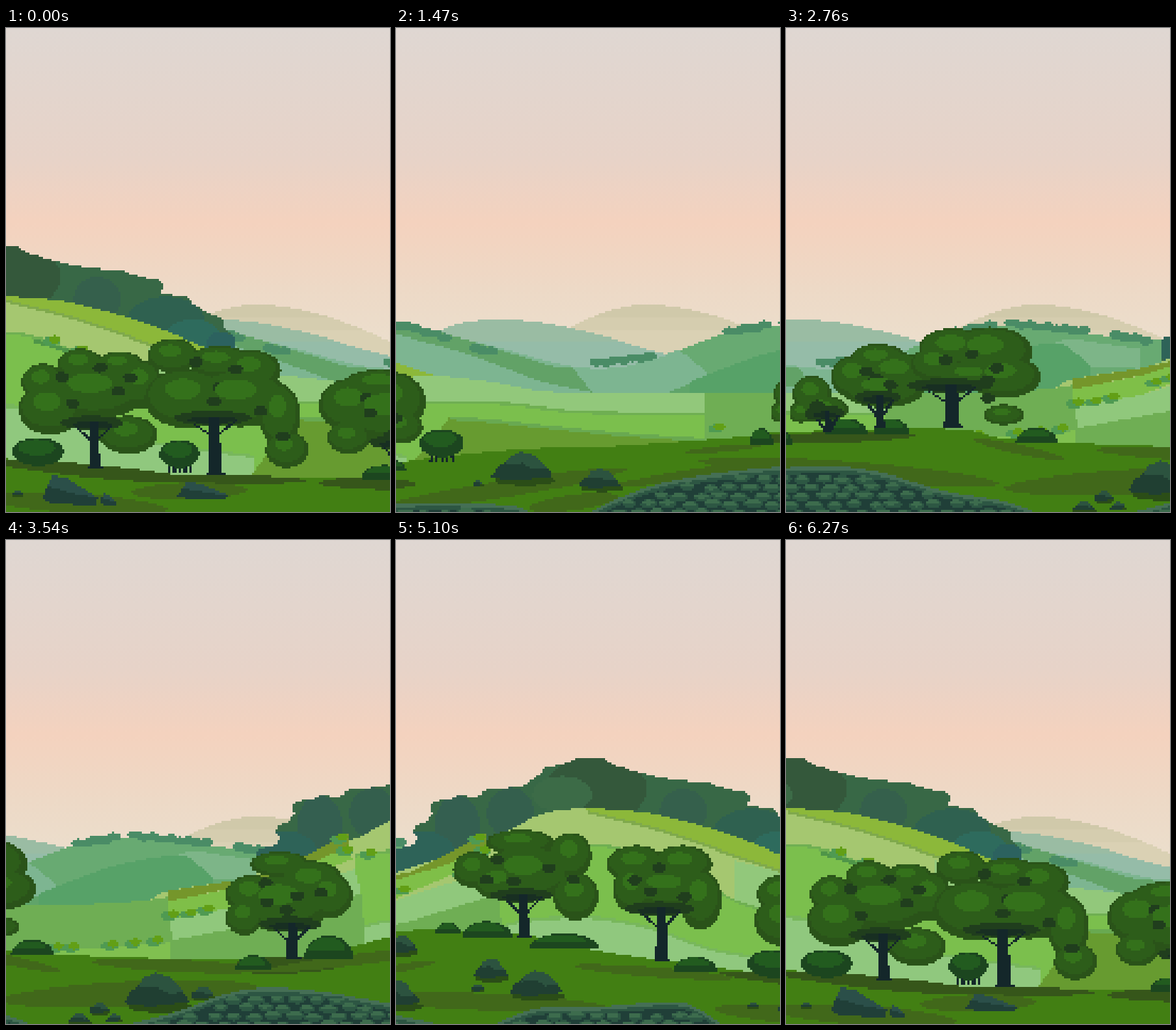
Animation, 540 px wide and 679 px high, one loop 6300 ms. Source, as an HTML page with a canvas:

```html
<!DOCTYPE html>
<html lang="en">
<head>
<meta charset="utf-8">
<title>Rolling hills</title>
<style>
html, body { margin: 0; width: 100%; height: 100%; overflow: hidden; }
canvas { display: block; width: 100vw; height: 100vh; image-rendering: pixelated; }
</style>
</head>
<body>
<canvas id="stage" width="178" height="224"></canvas>
<script>
const COLS = 178, ROWS = 224, CELL = 540 / COLS, STEP = 30, STEPS = 210;
const stage = document.getElementById('stage').getContext('2d');
let pen, span, seed = 7;
const random = () => (seed = seed * 16807 % 2147483647) / 2147483647;

// Crisp scanline fill; anything crossing a layer's end wraps to its start.
function poly(color, pts) {
  pen.fillStyle = color;
  const n = pts.length;
  for (let row = 0; row < ROWS; row++) {
    const y = (row + 0.5) * CELL, hits = [];
    for (let i = 0; i < n; i += 2) {
      const x1 = pts[i], y1 = pts[i + 1], x2 = pts[(i + 2) % n], y2 = pts[(i + 3) % n];
      if ((y1 <= y) !== (y2 <= y)) hits.push(x1 + (y - y1) * (x2 - x1) / (y2 - y1));
    }
    hits.sort((a, b) => a - b);
    for (let i = 0; i + 1 < hits.length; i += 2) {
      const a = Math.round(hits[i] / CELL), w = Math.round(hits[i + 1] / CELL) - a;
      for (const shift of [-span, 0, span]) pen.fillRect(a + shift, row, w, 1);
    }
  }
}

function arc(color, x, y, rx, ry, from, to) {
  const pts = [];
  for (let i = 0; i <= 28; i++) {
    const a = from + (to - from) * i / 28;
    pts.push(x + rx * Math.cos(a), y + ry * Math.sin(a));
  }
  poly(color, pts);
}
const oval = (color, x, y, rx, ry) => arc(color, x, y, rx, ry, 0, 2 * Math.PI);
const dome = (color, x, y, r, h) => arc(color, x, y, r, h, Math.PI, 2 * Math.PI);

// Smooth line through a few points.
function curve(...pts) {
  const out = [], last = pts.length / 2 - 1;
  const at = (i, k) => pts[2 * Math.max(0, Math.min(last, i)) + k];
  for (let i = 0; i < last; i++) {
    for (let s = 0; s < 8; s++) {
      const t = s / 8;
      for (let k = 0; k < 2; k++) {
        const a = at(i - 1, k), b = at(i, k), c = at(i + 1, k), d = at(i + 2, k);
        out.push(b + t / 2 * (c - a + t * (2 * a - 5 * b + 4 * c - d + t * (3 * (b - c) + d - a))));
      }
    }
  }
  return [...out, at(last, 0), at(last, 1)];
}

const lower = (pts, dy) => pts.map((v, i) => i % 2 ? v + dy : v);
const cap = (pts, top) => pts.map((v, i) => i % 2 ? Math.max(v, top) : v);
const ground = (color, pts, floor = 700) => poly(color, [...pts, pts[pts.length - 2], floor, pts[0], floor]);

function between(color, top, bottom) {
  const back = [];
  for (let i = bottom.length - 2; i >= 0; i -= 2) back.push(bottom[i], bottom[i + 1]);
  poly(color, [...top, ...back]);
}
const band = (color, pts, thick) => between(color, pts, lower(pts, thick));

function layer(width, speed, paint) {
  const canvas = document.createElement('canvas');
  canvas.width = span = width;
  canvas.height = ROWS;
  pen = canvas.getContext('2d');
  paint();
  return { canvas, width, speed };
}

function paintSky() {
  const sky = pen.createLinearGradient(0, 0, 0, 150);
  ['#dfd7d2', '#e3d5cd', '#e7d3c8', '#f4d2be', '#edd9c6', '#ebdfcd']
    .forEach((color, i) => sky.addColorStop(i / 5, color));
  pen.fillStyle = sky;
  pen.fillRect(0, 0, COLS, ROWS);
  const far = curve(200, 445, 262, 412, 310, 394, 360, 388, 425, 398, 480, 415, 540, 440);
  ground('#d0c9aa', far);
  ground('#d5cdaf', cap(far, 406));
  ground('#dad1b4', cap(far, 424));
}

function paintTeal() {
  const top = curve(0, 480, 120, 455, 200, 428, 255, 412, 338, 412, 431, 430, 521, 456, 637, 480);
  ground('#9abca3', top);
  ground('#95bca8', cap(top, 440));
}

function hedge(x1, y1, x2, y2) {
  const count = Math.max(1, Math.round((x2 - x1) / 13));
  for (let i = 0; i <= count; i++) {
    const k = i / count;
    oval('#4a8c66', x1 + (x2 - x1) * k, y1 + (y2 - y1) * k + i % 2 * 2, 10, 6);
  }
}

function paintMiddle() {
  const left = curve(200, 400, 280, 419, 400, 448, 505, 475, 580, 475, 660, 452);
  const right = curve(656, 452, 720, 429, 790, 418, 870, 419, 940, 433, 1115, 440);
  ground('#7db591', left);
  ground('#68aa72', right);
  poly('#7db591', [640, 456, 657, 452, 703, 490, 725, 520, 640, 520]);
  poly('#60a46a', [641, 512, 700, 487, 740, 520]);
  between('#62a267', curve(239, 411, 359, 438, 479, 475, 504, 475), curve(239, 425, 359, 458, 459, 495, 534, 512));
  poly('#7db588', [866, 440, 890, 436, 985, 450, 985, 478, 916, 475]);
  ground('#57a268', curve(671, 497, 726, 475, 786, 455, 866, 442, 890, 452, 916, 475), 514);
  hedge(250, 414, 272, 418);
  hedge(286, 422, 326, 433);
  hedge(370, 449, 392, 453);
  hedge(540, 469, 615, 460);
  hedge(727, 426, 776, 417);
  hedge(806, 414, 907, 425);
  hedge(954, 431, 994, 437);
}

function paintWood() {
  const top = [-280, 436, -250, 428, -235, 398, -212, 366, -185, 359, -168, 363, -140, 349, -100, 346, -55, 318, -15, 307, 8, 306,
    40, 320, 100, 335, 160, 341, 205, 352, 215, 372, 245, 376, 290, 404, 321, 434];
  ground('#386846', top, 472);
  for (let i = 4; i < top.length - 2; i += 2) oval('#386846', top[i], top[i + 1] + 11, 16, 12);
  // Crowns stay inside the silhouette.
  pen.globalCompositeOperation = 'source-atop';
  oval('#34583b', 5, 350, 72, 46);
  oval('#3c6b47', -42, 357, 42, 25);
  oval('#345f4d', -115, 383, 33, 36);
  oval('#345f50', -190, 400, 32, 42);
  oval('#2e6358', -245, 440, 52, 32);
  oval('#35604c', 128, 381, 33, 32);
  oval('#2f6150', 225, 412, 55, 35);
  oval('#2e6b5d', 263, 433, 38, 24);
  oval('#2c625f', 303, 444, 22, 17);
  pen.globalCompositeOperation = 'source-over';
}

function shrub(x, y) {
  oval('#4f9a52', x - 3, y + 2, 12, 6);
  oval('#629f16', x + 2, y - 1, 8, 5);
}

function paintHill() {
  paintWood();
  const slope = curve(-10, 376, 70, 382, 130, 395, 200, 416, 260, 440, 320, 465, 385, 487);
  const foot = curve(385, 487, 475, 498, 550, 511, 800, 513, 915, 512, 1000, 507, 1030, 493, 1125, 478, 1154, 468);
  ground('#a5c770', [...curve(-280, 468, -150, 424, -72, 385, -10, 376), ...slope, ...foot]);
  poly('#92c87b', [200, 450, 345, 486, 385, 487, ...curve(385, 487, 475, 498, 550, 511, 800, 513), 800, 545, 200, 545]);
  const seam = curve(-7, 380, 75, 400, 140, 420, 205, 443, 350, 491);
  between('#8cb83a', slope, seam);
  band('#7fa94c', seam, 4);

  const green = curve(-140, 441, -27, 428, 43, 433, 143, 472, 245, 518, 475, 525, 595, 537, 800, 540);
  ground('#7bbf4d', green);
  band('#6faf52', green, 4);
  const pale = curve(-140, 545, -97, 533, -7, 528, 80, 542, 165, 572, 260, 588, 350, 600);
  ground('#90c87e', pale);
  band('#78b75c', pale, 4);
  poly('#92c87b', [428, 512, 440, 497, 475, 498, 540, 511, 520, 524, 440, 518]);
  const olive = curve(410, 545, 475, 550, 640, 567, 800, 578);
  poly('#679b30', [...olive, 800, 650, 335, 640]);
  band('#69a951', olive, 5);

  poly('#6fae54', [767, 513, 915, 512, 1000, 507, 1040, 500, 1040, 600, 767, 600]);
  poly('#80c050', [875, 576, 1040, 565, 1040, 600, 875, 600]);
  poly('#7fbf48', [1030, 508, 1130, 488, 1284, 432, 1292, 447, 1130, 515, 1035, 533]);
  poly('#90c87c', [1035, 533, 1130, 515, 1295, 462, 1303, 497, 1180, 535, 1037, 565]);
  poly('#6fae54', [1035, 562, 1180, 535, 1303, 497, 1312, 600, 1035, 600]);
  between('#75962b', [1030, 493, 1125, 478, 1182, 465, 1287, 412], [1030, 508, 1130, 487, 1230, 455, 1286, 430]);

  band('#4f9548', curve(38, 437, 60, 441, 100, 455, 130, 466), 6);
  shrub(-152, 435);
  shrub(-120, 440);
  shrub(-77, 432);
  shrub(-182, 468);
  shrub(-30, 426);
  shrub(66, 438);
  shrub(106, 451);
  shrub(787, 560);
  shrub(1275, 419);
  for (let i = 0; i < 3; i++) {
    shrub(1037 + i * 25, 526 - i * i * 1.7);
    shrub(953 + i * 31, 568 - i * 3);
    if (i < 2) {
      shrub(875 + i * 23, 571);
      shrub(1147 + i * 22, 497 - i * 6);
    }
  }
}

function limb(x1, y1, w1, x2, y2, w2) {
  poly('#14272a', [x1 - w1, y1, x1 + w1, y1, x2 + w2, y2, x2 - w2, y2]);
}

// Crowns are ovals; shading sits between neighbours and under the canopy.
function tree(dx, trunk, fork, foot, size, crowns) {
  const all = crowns.map(([x, y, rx, ry]) => [x + dx, y, rx, ry]), x = trunk + dx;
  const branches = () => {
    limb(x - 1, fork, size * 0.7, x, foot, size);
    limb(x, foot - 5, size, x + 1, foot, size * 1.5);
    limb(x - size * 3, fork + 10, 2, x - 2, fork + 30, 3);
    limb(x + size * 3, fork + 5, 2, x + 2, fork + 28, 3);
  };
  branches();
  all.forEach(([cx, cy, rx, ry]) => oval('#2a5319', cx, cy, rx, ry));
  all.forEach(([cx, cy, rx, ry]) => oval('#2d5d1a', cx - rx * 0.04, cy - ry * 0.12, rx * 0.86, ry * 0.8));
  all.forEach(([cx, cy, rx, ry], i) => {
    oval('#34711b', cx - rx * 0.1, cy - ry * 0.3, rx * 0.42, ry * 0.36);
    if (!i) return;
    const [px, py] = all[i - 1];
    oval('#203e1d', (cx + px) / 2, (cy + py) / 2 + 5, 10, 7);
  });
  oval('#203e1d', x - 4, fork + 2, size * 5.5, 10);
  oval('#182f22', x - 4, fork + 5, size * 3.5, 5);
  branches();
}

function bush(x, base, r, h = 22) {
  dome('#1c461f', x, base, r, h);
  dome('#225b1f', x - r * 0.08, base - h * 0.4, r * 0.72, h * 0.52);
}

function roundBush(x, y, r, h, legs) {
  for (let i = -2; legs && i < 3; i++) limb(x + i * 7, y + h - 8, 2, x + i * 8, y + h + 8, 2);
  oval('#1c461f', x, y, r, h);
  oval('#225b1f', x - r * 0.06, y - 6, r * 0.72, h * 0.56);
}

function rock(x, base, r, h = r * 0.9) {
  oval('#2b4d17', x + r * 0.1, base, r, h * 0.18);
  const at = (...uv) => uv.map((v, i) => i % 2 ? base - v * h : x + v * r);
  poly('#203f32', at(-1, 0.1, -0.8, 0.45, -0.04, 1, 0.76, 0.5, 1, 0.15, -0.2, 0));
  poly('#2c533f', at(-0.56, 0.55, -0.4, 0.85, -0.04, 1, 0.4, 0.88, 0.8, 0.45, 0.36, 0.38, 0, 0.6));
}

function flatRock(x, base, r, h) {
  const at = (...uv) => uv.map((v, i) => i % 2 ? base - v * h : x + v * r);
  poly('#203f38', at(-1, 0.2, -0.64, 1, -0.1, 0.9, 1, 0.25, 0.9, 0, -0.6, 0.05));
  poly('#2b4f49', at(-0.8, 0.65, -0.64, 1, -0.1, 0.9, 1, 0.25, 0.2, 0.38));
}

function edgeAt(pts, x) {
  let i = 0;
  while (i < pts.length - 4 && pts[i + 2] < x) i += 2;
  return pts[i + 1] + (pts[i + 3] - pts[i + 1]) * (x - pts[i]) / (pts[i + 2] - pts[i]);
}

function wall(...pts) {
  const edge = curve(...pts);
  ground('#203f38', edge);
  band('#456f55', edge, 5);
  band('#2d5643', lower(edge, 5), 5);
  for (let y = 631, row = 0; y < 690; y += 12, row++) {
    for (let x = pts[0] + row % 2 * 14; x < pts[pts.length - 2]; x += 29) {
      const sx = x + random() * 8, sy = y + random() * 4, r = 10 + random() * 4;
      if (sy - 10 < edgeAt(edge, sx)) continue;
      oval('#2d5743', sx, sy, r, 6);
      oval('#3d6c4d', sx - 1, sy - 2, r * 0.8, 3.2);
    }
  }
}

// Tapered streak of soil or shadow.
function streak(x1, y1, x2, y2, thick, color = '#41681a') {
  const top = [], bottom = [];
  for (let i = 0; i <= 20; i++) {
    const k = i / 20, w = thick * Math.sqrt(Math.sin(Math.PI * k)) / 2;
    const x = x1 + (x2 - x1) * k, y = y1 + (y2 - y1) * k;
    top.push(x, y - w);
    bottom.push(x, y + w);
  }
  between(color, top, bottom);
}

function paintMeadow() {
  ground('#427f13', [...curve(0, 605, 130, 619, 300, 630, 504, 632), ...curve(504, 632, 600, 610, 764, 592, 904, 587, 1091, 573, 1150, 566,
    1353, 563, 1432, 577, 1632, 587, 1832, 588), ...curve(1832, 588, 1922, 570, 1978, 557, 2108, 547, 2248, 555, 2348, 577, 2548, 605)]);
  const shade = '#36561a';
  streak(-30, 608, 270, 636, 18, shade);
  streak(200, 632, 425, 635, 12, shade);
  streak(438, 638, 626, 640, 18, shade);
  streak(1090, 577, 1298, 572, 15, shade);
  streak(1740, 600, 1915, 594, 24, shade);
  streak(-40, 658, 230, 676, 28);
  streak(175, 652, 340, 648, 24);
  streak(560, 676, 920, 620, 24);
  streak(780, 674, 910, 658, 22);
  streak(890, 644, 1160, 606, 14);
  streak(1020, 608, 1420, 640, 28);
  streak(1000, 596, 1110, 586, 9);
  streak(1380, 578, 1510, 606, 14);
  streak(1420, 646, 1790, 628, 34);
  streak(1550, 592, 1800, 604, 18);
  streak(1790, 606, 2070, 571, 16);
  streak(2000, 614, 2120, 592, 12);
  streak(1980, 640, 2360, 655, 24);
  streak(2310, 598, 2540, 616, 14);
}

function paintTrees() {
  tree(0, 125, 552, 619, 8, [[52, 498, 30, 27], [105, 472, 33, 22], [160, 472, 34, 18], [190, 500, 30, 34], [125, 510, 75, 38], [62, 535, 44, 36], [172, 571, 42, 27]]);
  tree(0, 294, 545, 628, 10, [[235, 460, 36, 24], [300, 468, 45, 22], [345, 480, 42, 28], [255, 520, 60, 42], [330, 520, 70, 40], [385, 545, 28, 45], [395, 592, 30, 26]]);
  tree(364, 189, 580, 622, 7, [[165, 500, 55, 21], [122, 530, 46, 38], [175, 540, 70, 40], [225, 525, 48, 42], [235, 560, 34, 24], [118, 575, 30, 23]]);
  tree(813, 362, 538, 565, 5, [[340, 515, 27, 27], [355, 535, 36, 18], [325, 540, 17, 14]]);
  tree(813, 436, 517, 562, 6, [[433, 465, 40, 22], [400, 490, 34, 30], [460, 485, 48, 30], [440, 508, 58, 25]]);
  tree(813, 537, 500, 562, 11, [[515, 472, 36, 25], [540, 450, 50, 28], [590, 455, 60, 35], [610, 490, 52, 30], [565, 488, 50, 20], [610, 543, 28, 14]]);
  tree(1432, 403, 537, 589, 8, [[385, 455, 42, 18], [345, 498, 36, 28], [390, 510, 68, 40], [430, 480, 45, 30], [455, 500, 33, 32], [335, 530, 26, 25]]);
  tree(1808, 435, 497, 558, 8, [[430, 425, 48, 18], [365, 463, 30, 26], [400, 480, 35, 25], [440, 468, 65, 40], [500, 443, 30, 32], [508, 500, 32, 34]]);
  tree(2306, 131, 516, 593, 9, [[160, 455, 42, 26], [95, 455, 42, 26], [90, 490, 28, 34], [140, 488, 60, 28], [185, 505, 30, 42]]);
}

function paintFront() {
  paintMeadow();
  bush(1108, 584, 17);
  bush(1201, 570, 30);
  bush(1265, 570, 25);
  bush(1469, 583, 30);
  bush(2136, 553, 18, 17);
  bush(2191, 557, 35);
  paintTrees();
  bush(532, 634, 33, 20);
  bush(592, 622, 17, 15);
  bush(1780, 605, 26);
  bush(1886, 590, 36, 35);
  bush(2299, 574, 49);
  bush(2484, 607, 31);
  roundBush(45, 595, 36, 20);
  roundBush(244, 598, 28, 20, true);
  roundBush(659, 583, 31, 20, true);

  flatRock(90, 670, 40, 42);
  flatRock(144, 670, 12, 17);
  flatRock(277, 662, 36, 25);
  rock(16, 656, 8);
  rock(710, 642, 8);
  rock(772, 635, 44);
  rock(881, 646, 30);
  rock(1644, 655, 46, 47);
  rock(1708, 643, 18);
  rock(1563, 664, 16);
  rock(1535, 678, 16);
  rock(1584, 676, 12);
  rock(2071, 580, 22, 26);
  rock(2196, 616, 24, 29);
  rock(2178, 633, 10);
  rock(2260, 640, 38, 35);
  rock(2060, 655, 38, 38);
  rock(1988, 641, 12);

  wall(545, 690, 600, 668, 764, 672, 790, 700);
  wall(845, 700, 873, 677, 963, 640, 1093, 620, 1183, 616, 1253, 625, 1340, 650, 1430, 666, 1500, 695);
  wall(1560, 690, 1662, 665, 1762, 632, 1862, 632, 1968, 650, 2118, 679, 2160, 700);
  wall(2180, 690, 2258, 658, 2348, 655, 2446, 648, 2486, 657, 2535, 690);
}

const layers = [
  layer(COLS, 0, paintSky),
  layer(210, 1, paintTeal),
  layer(368, 1.75, paintMiddle),
  layer(473, 2.25, paintHill),
  layer(840, 4, paintFront)
];

function draw(now) {
  const step = Math.floor(now / STEP) % STEPS;
  for (const { canvas, width, speed } of layers) {
    const x = -Math.floor(step * speed);
    stage.drawImage(canvas, x, 0);
    stage.drawImage(canvas, x + width, 0);
  }
}

const start = performance.now();
function tick() {
  draw(performance.now() - start);
  requestAnimationFrame(tick);
}
tick();
</script>
</body>
</html>
```
